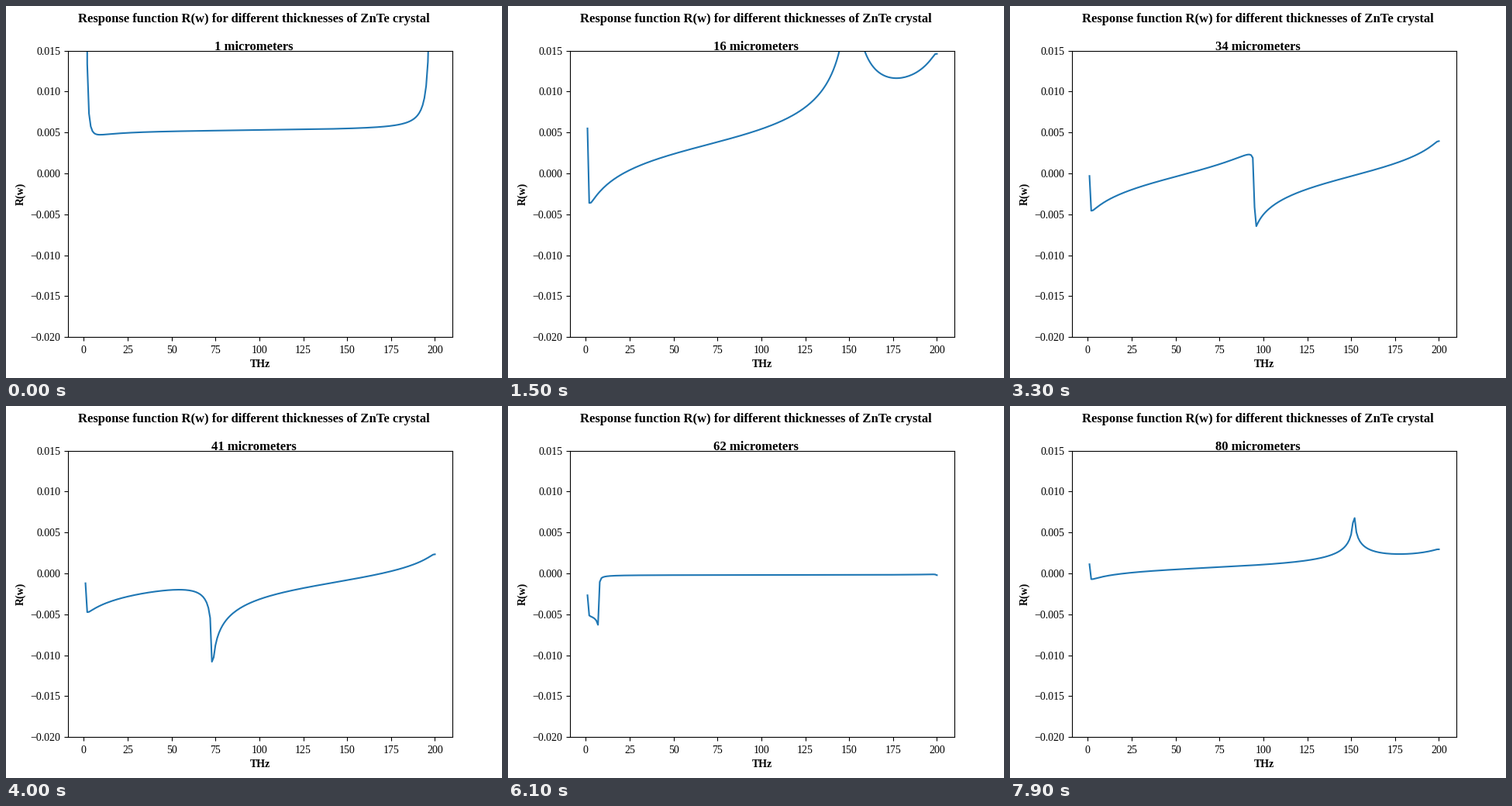
A matplotlib script for the animation above (8 s loop, 640 px wide and 480 px high).

```python
import numpy as np
import matplotlib.pyplot as plt
from matplotlib.animation import FuncAnimation

plt.rcParams["font.family"] = "Liberation Serif"

N = 200
FRAMES = 80
GAIN = 2.2
MISMATCH = 2 * np.pi / 64.14  # phase mismatch per THz and micrometer

freq = np.arange(1, N + 1)


def response(thickness):
    """Inverse transform of the phase-matching factor of the crystal."""
    phase = 1j * MISMATCH * thickness * freq
    return GAIN * np.fft.ifft((np.exp(phase) - 1) / phase).real


def heading(thickness):
    return ("Response function R(w) for different thicknesses of ZnTe crystal"
            f"\n\n{thickness} micrometers")


fig, ax = plt.subplots(figsize=(6.4, 4.8), dpi=100)
title = fig.suptitle(heading(1), y=0.982, fontweight="bold")
line, = ax.plot(freq, response(1))
ax.set_ylim(-0.02, 0.015)
ax.tick_params(axis="x", pad=4.2)
ax.set_xlabel("THz", fontweight="bold")
ax.set_ylabel("R(w)", fontweight="bold")


def update(i):
    line.set_ydata(response(i + 1))
    title.set_text(heading(i + 1))
    return line, title


anim = FuncAnimation(fig, update, frames=FRAMES, interval=100,
                     repeat=True, repeat_delay=0)
plt.show()
```
